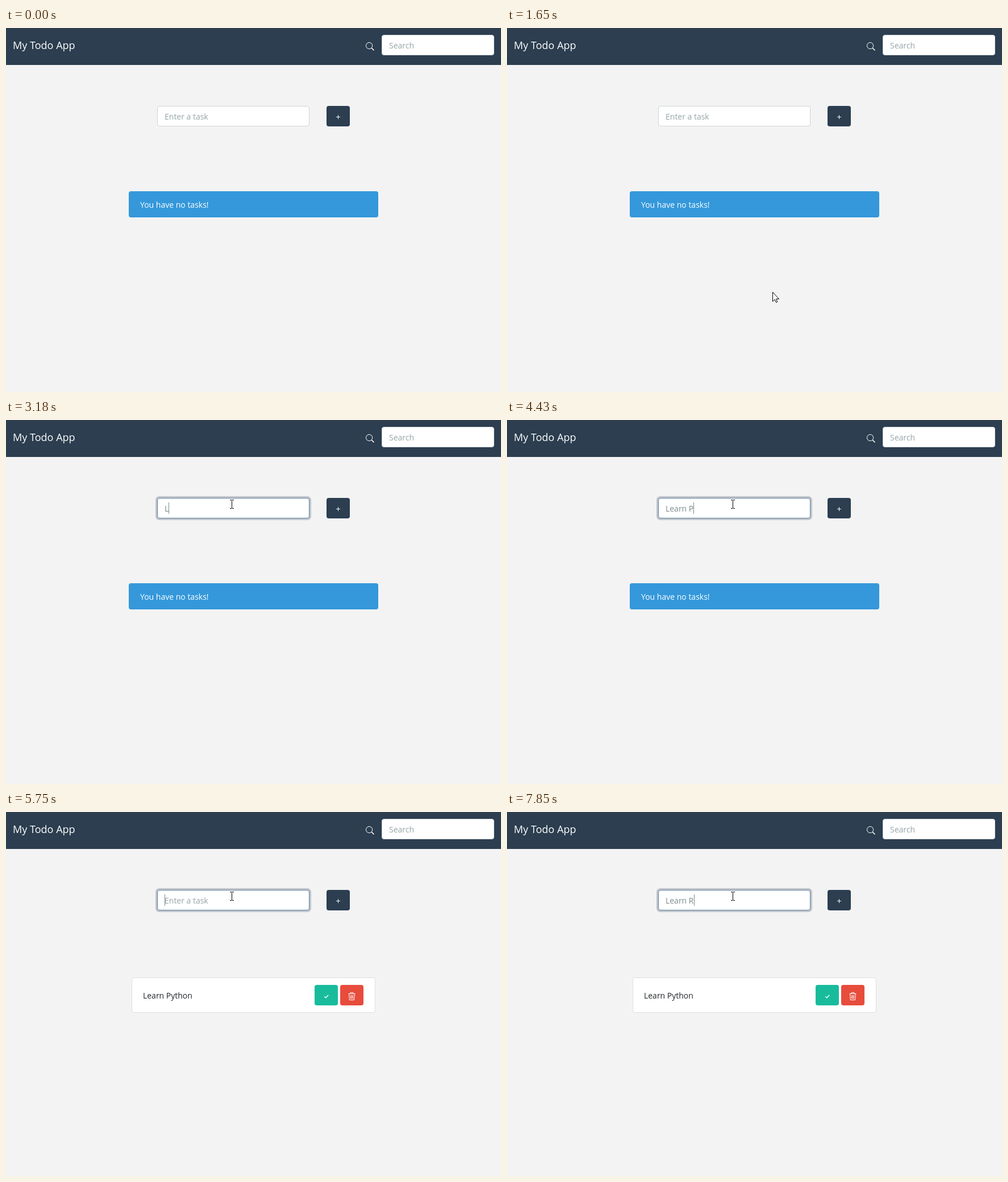
Animation, 871 px wide and 640 px high, one loop 8000 ms. Source, as an HTML page:

```html
<!DOCTYPE html>
<html lang="en">
<head>
<meta charset="utf-8">
<title>My Todo App</title>
<style>
  html, body { margin: 0; width: 100%; height: 100%; overflow: hidden; background: #f3f3f3; }
  svg { display: block; }
  text { font: 14px "Open Sans", "Noto Sans", sans-serif; white-space: pre; }
  .line { fill: none; stroke: #fff; }
</style>
</head>
<body>
<svg width="871" height="640" viewBox="0 0 871 640">
  <rect width="871" height="65" fill="#2c3e50"/>
  <text x="12" y="37" fill="#fff" style="font-size:18px">My Todo App</text>
  <g class="line">
    <circle cx="639.1" cy="31.1" r="5.6"/>
    <path d="M643.3 35.3l4.1 4.1" stroke-width="1.5"/>
  </g>
  <rect x="661.5" y="12.5" width="197" height="35" rx="3.5" fill="#fff" stroke="#ced4da"/>
  <text x="674" y="36" fill="#95a5a6">Search</text>

  <rect id="ring" x="263" y="134" width="274" height="42" rx="6.5" fill="#2c3e50"/>
  <rect id="field" x="266.5" y="137.5" width="267" height="35" rx="3.5" fill="#fff"/>
  <text id="entry" x="279" y="161"></text>
  <rect id="caret" y="145" width="1" height="20" fill="#7b8a8b"/>
  <rect x="564" y="137" width="41" height="36" rx="4" fill="#2c3e50"/>
  <path class="line" d="M581 156.5h7M584.5 153v7"/>

  <g id="empty">
    <rect x="216" y="287" width="439" height="46" rx="4" fill="#3498db"/>
    <text x="236" y="316" fill="#fff">You have no tasks!</text>
  </g>

  <g id="card">
    <rect x="221.5" y="291.5" width="428" height="61" rx="3.5" fill="#fff" stroke="#dfdfdf"/>
    <text x="241" y="328" fill="#212529">Learn Python</text>
    <rect x="543" y="304" width="41" height="36" rx="4" fill="#18bc9c"/>
    <path class="line" d="M560.3 324.3l2.4 2.4 4.5-5" stroke-width="1.3"/>
    <rect x="588" y="304" width="41" height="36" rx="4" fill="#e74c3c"/>
    <path class="line" d="M602.5 319.5h12M606 319v-1.5h5v1.5M603.6 320l.8 10.5h8.2l.8-10.5M606.3 322l.3 6.5M608.5 322v6.5M610.7 322l-.3 6.5"/>
  </g>

  <path id="arrow" d="M.5.5v16.3l3.7-3.5 2.4 5.2 2.3-1-2.3-5.1h5z" fill="#fff" stroke="#000"/>
  <path id="beam" d="M394 140.5h3M398 140.5h3M397.5 141v14M394 155.5h3M398 155.5h3" stroke="#000"/>
</svg>
<script>
const LOOP = 8000, FOCUS = 2400, BEAM = 1950, CLEAR = 5690, ADDED = 5750;
const [ring, field, entry, caret, empty, card, arrow, beam] =
  ["ring", "field", "entry", "caret", "empty", "card", "arrow", "beam"].map(id => document.getElementById(id));

// Pointer stops: time, x, y
const stops = [
  [850, 652, 601], [930, 600, 565], [1010, 565, 538],
  [1650, 467, 464], [1710, 402, 368], [1790, 366, 270], [1870, 380, 190]
];

// Key press times for each entry
const entries = [
  { start: FOCUS, blink: 2880, text: "Learn Python",
    keys: [3180, 3490, 3580, 3730, 3880, 4120, 4430, 4660, 4830, 4900, 4980, 5150] },
  { start: CLEAR, blink: 6220, text: "Learn R",
    keys: [6680, 6840, 6920, 7000, 7300, 7480, 7850] }
];

const show = (el, on) => el.setAttribute("visibility", on ? "visible" : "hidden");

function draw(t) {
  const focused = t >= FOCUS;
  show(ring, focused);
  ring.setAttribute("opacity", t < 2480 ? 0.12 : 0.25);
  field.setAttribute("stroke", !focused ? "#ced4da" : t < 2480 ? "#94a9be" : "#597ea2");

  const { text, keys, blink } = entries[t < CLEAR ? 0 : 1];
  const typed = text.slice(0, keys.filter(k => k <= t).length);
  entry.textContent = typed || "Enter a task";
  entry.setAttribute("fill", typed ? "#7b8a8b" : "#95a5a6");
  const width = typed ? entry.getComputedTextLength() : 0;
  caret.setAttribute("x", Math.round(279 + width));
  show(caret, focused && (typed || t < blink));

  show(empty, t < ADDED);
  show(card, t >= ADDED);

  const stop = stops.filter(s => s[0] <= t).pop();
  show(arrow, stop && t < BEAM);
  show(beam, t >= BEAM);
  if (stop) arrow.setAttribute("transform", `translate(${stop[1]} ${stop[2]})`);
}

const begin = performance.now();
function tick() {
  draw((performance.now() - begin) % LOOP);
  requestAnimationFrame(tick);
}
tick();
</script>
</body>
</html>
```
